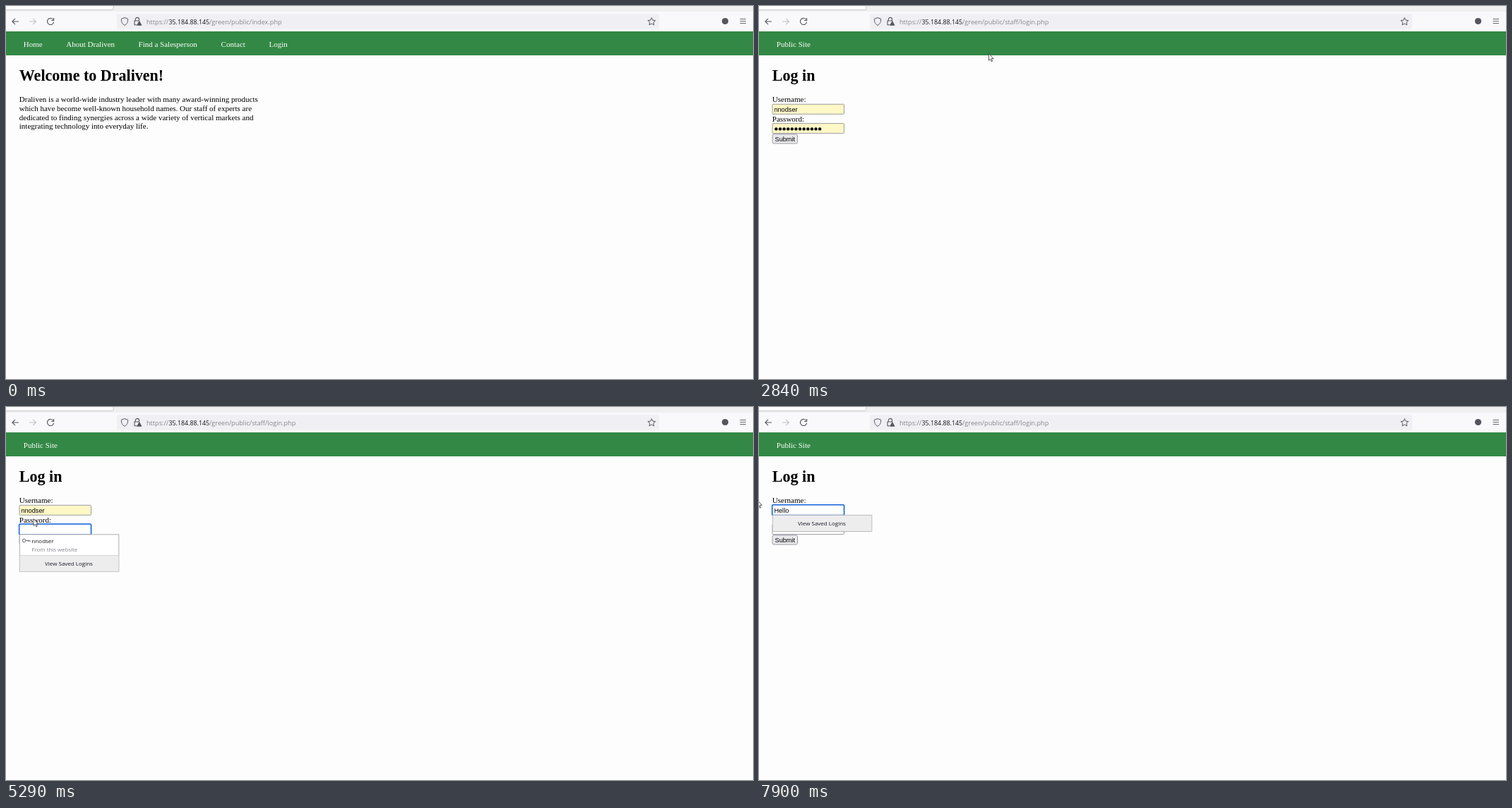
Recreate the animation shown at these times as an HTML page with a canvas. Size 1058 px wide and 529 px high, loop 8 s.

```html
<!DOCTYPE html>
<html lang="en">
<head>
<meta charset="utf-8">
<title>Log in</title>
<style>
  html, body { margin: 0; width: 100%; height: 100%; overflow: hidden; background: #fdfdfd; }
  canvas { display: block; }
</style>
</head>
<body>
<canvas id="stage" width="1058" height="529"></canvas>
<script>
const ctx = document.getElementById('stage').getContext('2d');
const LOOP = 8000;
const SERIF = '"Liberation Serif", "Times New Roman", serif';
const ARIAL = '9.18px "Liberation Sans", Arial, sans-serif';
const UI = '"Open Sans", "Noto Sans", sans-serif';
const BODY = '11.02px ' + SERIF;
const HEADING = 'bold 22.04px ' + SERIF;
const USER = 'nnodser';
const DOTS = 12, PITCH = 5.62;
const TEXT_X = 21.4;
const USER_Y = 139, PASS_Y = 166.3;

// Times of page load, focus, clearing and key presses
const LOAD = 2700, FOCUS_PASS = 3730, CLEAR = 4610, POPUP = 4680, FOCUS_USER = 5770;
const KEYS = [6700, 7030, 7240, 7400, 7570];
const SHRINK = 6830;

// Pointer path: time, x, y
const PATH = [
  [390, 914, 472], [460, 560, 270], [530, 205, 90], [600, 320, 11], [670, 427, 12],
  [870, 427, 8], [950, 426, 1], [1090, 416, 18], [1220, 397, 48], [1350, 387.5, 61.5],
  [1700, 387.5, 61.5], [1890, 372.3, 50.5], [2180, 372.3, 50.5], [2500, 386, 52],
  [2700, 386, 52], [2900, 300, 74], [3120, 175, 122], [3320, 108, 142], [3450, 94.5, 145.5],
  [3520, 94, 149], [3730, 92, 175], [3790, 90, 175], [4080, -3.5, 165],
  [5020, -3.5, 165], [5250, 30, 160], [5450, 74, 153], [5570, 81.5, 152.5],
  [5780, 81.5, 152.5], [6100, -2.5, 132]
];
// Intervals in which the mouse button is down
const PRESSES = [[1350, 1500], [2040, 2200], [FOCUS_PASS, 4280], [FOCUS_USER, 6170]];

const within = (t, a, b) => t >= a && t < b;

function pointer(t) {
  if (t < PATH[0][0]) return null;
  let i = 0;
  while (i < PATH.length - 1 && PATH[i + 1][0] <= t) i++;
  const a = PATH[i], b = PATH[i + 1] || a;
  const k = a === b ? 0 : (t - a[0]) / (b[0] - a[0]);
  return { x: a[1] + (b[1] - a[1]) * k, y: a[2] + (b[2] - a[2]) * k };
}

function rect(x, y, w, h, color) {
  ctx.fillStyle = color;
  ctx.fillRect(x, y, w, h);
}

function box(x, y, w, h, r, fill, stroke, width = 1) {
  ctx.beginPath();
  ctx.roundRect(x, y, w, h, r);
  if (fill) { ctx.fillStyle = fill; ctx.fill(); }
  if (stroke) { ctx.strokeStyle = stroke; ctx.lineWidth = width; ctx.stroke(); }
}

function text(str, x, y, font, color = '#000', align = 'left') {
  ctx.font = font;
  ctx.fillStyle = color;
  ctx.textAlign = align;
  ctx.fillText(str, x, y);
}

function path(d, stroke, width = 1, fill) {
  const p = new Path2D(d);
  if (fill) { ctx.fillStyle = fill; ctx.fill(p); }
  if (stroke) { ctx.strokeStyle = stroke; ctx.lineWidth = width; ctx.stroke(p); }
}

function disc(x, y, r, color) {
  ctx.beginPath();
  ctx.arc(x, y, r, 0, Math.PI * 2);
  ctx.fillStyle = color;
  ctx.fill();
}

function chrome(page) {
  const ink = '#55555e';
  rect(0, 0, 1058, 8, '#f0f0f1');
  box(-5, -6, 157, 11.5, 2, '#fff', '#bdbdc2', 0.8);
  rect(0, 8, 1058, 28, '#f9f9fb');
  box(157, 11, 768, 21.5, 2.5, '#f0f0f4');

  path('M18 22H8.8M13 17.8L8.8 22L13 26.2', ink, 1.1);
  path('M33 22H42.4M38.2 17.8L42.4 22L38.2 26.2', '#c2c2c6', 1.1);
  path('M66.6 19A4.6 4.6 0 1 0 67.6 22.6M67.6 17V20.4H64.2', ink, 1.1);
  path('M168 16.6L172.6 18.2C172.8 22.5 171.6 25.5 168 27.3C164.4 25.5 163.2 22.5 163.4 18.2Z', ink, 1);
  path('M183.3 21V19A2.6 2.6 0 0 1 188.5 19V21M185.5 26.8H182V21H189', ink, 1.1);
  path('M188.8 21.4L192 27.3H185.6Z', ink, 0.8, ink);

  let star = 'M';
  for (let i = 0; i < 10; i++) {
    const a = i * Math.PI / 5 - Math.PI / 2, r = i % 2 ? 2.7 : 5.7;
    star += (i ? 'L' : '') + (914.4 + r * Math.cos(a)) + ' ' + (22.3 + r * Math.sin(a));
  }
  path(star + 'Z', ink, 1);
  disc(1018.5, 21.5, 4.6, ink);
  path('M1039.5 18.5H1048M1039.5 21.5H1048M1039.5 24.5H1048', ink, 0.9);

  text('https://', 199, 25.6, '9.15px ' + UI, '#85858d');
  text('35.184.88.145', 230.5, 25.6, '8.85px ' + UI, '#15141a');
  text('/green/public/' + page, 288, 25.6, '9.15px ' + UI, '#85858d');
  rect(0, 36, 1058, 34, '#338845');
}

function nav(str, x) {
  text(str, x, 58.3, BODY, '#fff');
}

function homePage() {
  nav('Home', 24.8);
  nav('About Draliven', 85.3);
  nav('Find a Salesperson', 187.5);
  nav('Contact', 304.6);
  nav('Login', 372.5);
  text('Welcome to Draliven!', 18.8, 105.6, HEADING);
  [
    'Draliven is a world-wide industry leader with many award-winning products',
    'which have become well-known household names. Our staff of experts are',
    'dedicated to finding synergies across a wide variety of vertical markets and',
    'integrating technology into everyday life.'
  ].forEach((line, i) => text(line, 18.8, 136.3 + i * 12.7, BODY));
}

function field(y, filled, focused) {
  const fill = filled ? '#fff7c6' : '#fff';
  if (focused) {
    box(17.6, y - 1.2, 104, 17, 2.5, '#bcd6f8');
    box(18.7, y - 0.2, 101.8, 14.8, 1.5, fill, '#1565dd', 1.5);
  } else {
    box(19, y + 0.3, 101.5, 14, 1, fill, '#92929c', 0.9);
  }
}

function caret(x, y) {
  rect(x, y + 1.7, 0.9, 11, '#000');
}

// Draws content and, over it, the part selected from the nearest edge to the pointer
function selectable(draw, edges, y, x) {
  draw('#000');
  if (x === null) return;
  const start = edges.reduce((a, b) => Math.abs(b - x) < Math.abs(a - x) ? b : a);
  const end = edges[edges.length - 1];
  if (start >= end) return;
  ctx.save();
  ctx.beginPath();
  ctx.rect(start, y + 1.6, end - start, 11.4);
  ctx.clip();
  rect(start, y, end - start, 15, '#0078d7');
  draw('#fff');
  ctx.restore();
}

function userText(x) {
  ctx.font = ARIAL;
  const edges = Array.from({ length: USER.length + 1 },
    (_, i) => TEXT_X + ctx.measureText(USER.slice(0, i)).width);
  selectable(c => text(USER, TEXT_X, USER_Y + 10.8, ARIAL, c), edges, USER_Y, x);
  return edges[USER.length];
}

function passText(x) {
  const edges = Array.from({ length: DOTS + 1 }, (_, i) => TEXT_X + i * PITCH);
  selectable(c => {
    for (let i = 0; i < DOTS; i++) disc(TEXT_X + (i + 0.52) * PITCH, PASS_Y + 8.1, 2.2, c);
  }, edges, PASS_Y, x);
}

function popup(y, full) {
  const h = full ? 52.4 : 23;
  const foot = y + h - 22.6;
  box(19.3, y, 140.5, h, 0, '#fff', '#a6a6aa', 0.9);
  rect(19.8, foot, 139.5, 22.1, '#ededee');
  text('View Saved Logins', 89, foot + 14.3, '8px ' + UI, '#1c1b22', 'center');
  if (!full) return;
  rect(19.8, foot - 0.5, 139.5, 0.7, '#c9c9cc');
  path('M28 162H34V163.8M31.8 162V163.6M28 162A2.3 2.3 0 1 0 23.4 162A2.3 2.3 0 1 0 28 162'
    .replace(/(\d) (16[\d.]+)/g, (_, a, b) => a + ' ' + (b - 153.4 + y))
    .replace(/V(16[\d.]+)/g, (_, b) => 'V' + (b - 153.4 + y)), '#5a5a62', 0.9);
  text(USER, 36.5, y + 11.8, '8px ' + UI, '#15141a');
  text('From this website', 36.5, y + 24.6, '7.85px ' + UI, '#85858d');
}

function loginPage(t, mouse) {
  const onUser = t >= FOCUS_USER;
  const onPass = within(t, FOCUS_PASS, FOCUS_USER);
  const typing = t >= KEYS[0];

  nav('Public Site', 24.8);
  text('Log in', 18.8, 105.6, HEADING);
  text('Username:', 18.8, 136.3, BODY);
  text('Password:', 18.8, 163.6, BODY);
  box(19, 181.8, 35.5, 13.2, 2, '#e9e9ed', '#92929c', 0.9);
  text('Submit', 36.8, 192, ARIAL, '#000', 'center');

  field(PASS_Y, t < CLEAR, onPass);
  field(USER_Y, !typing, onUser);

  if (t < CLEAR) passText(onPass ? mouse.x : null);
  else if (onPass && !within(t, 4940, 5440)) caret(TEXT_X, PASS_Y);

  if (typing) {
    const typed = 'Hello'.slice(0, KEYS.filter(k => t >= k).length);
    text(typed, TEXT_X, USER_Y + 10.8, ARIAL);
    if (t < 7900) caret(TEXT_X + ctx.measureText(typed).width, USER_Y);
    popup(153.4, t < SHRINK);
  } else {
    const end = userText(onUser ? mouse.x : null);
    if (onUser && mouse.x > end) caret(end - 0.5, USER_Y);
  }
  if (within(t, POPUP, FOCUS_USER)) popup(180.8, true);
}

function drawPointer(t, { x, y }) {
  if (PRESSES.some(p => within(t, ...p))) disc(x, y, 8.4, 'rgba(238,222,8,0.62)');
  const overField = x > 19 && x < 121 &&
    (within(y, USER_Y, USER_Y + 15) || within(y, PASS_Y, PASS_Y + 15));
  ctx.save();
  ctx.translate(x, y);
  if (t >= LOAD && overField) {
    path('M-2 -4.3H-0.5L0 -3.8L0.5 -4.3H2M0 -3.8V3.8M-2 4.3H-0.5L0 3.8L0.5 4.3H2', '#33332c', 0.9);
  } else {
    path('M0 0V9.8L2.2 7.7L3.8 11.2L5.3 10.5L3.8 7.2H6.8Z', '#222', 0.75, '#fff');
  }
  ctx.restore();
}

function render(t) {
  const mouse = pointer(t);
  const home = t < LOAD;
  rect(0, 0, 1058, 529, '#fdfdfd');
  chrome(home ? 'index.php' : 'staff/login.php');
  if (home) homePage();
  else loginPage(t, mouse);
  if (mouse) drawPointer(t, mouse);
}

const start = performance.now();
function tick() {
  render((performance.now() - start) % LOOP);
  requestAnimationFrame(tick);
}
tick();
</script>
</body>
</html>
```
